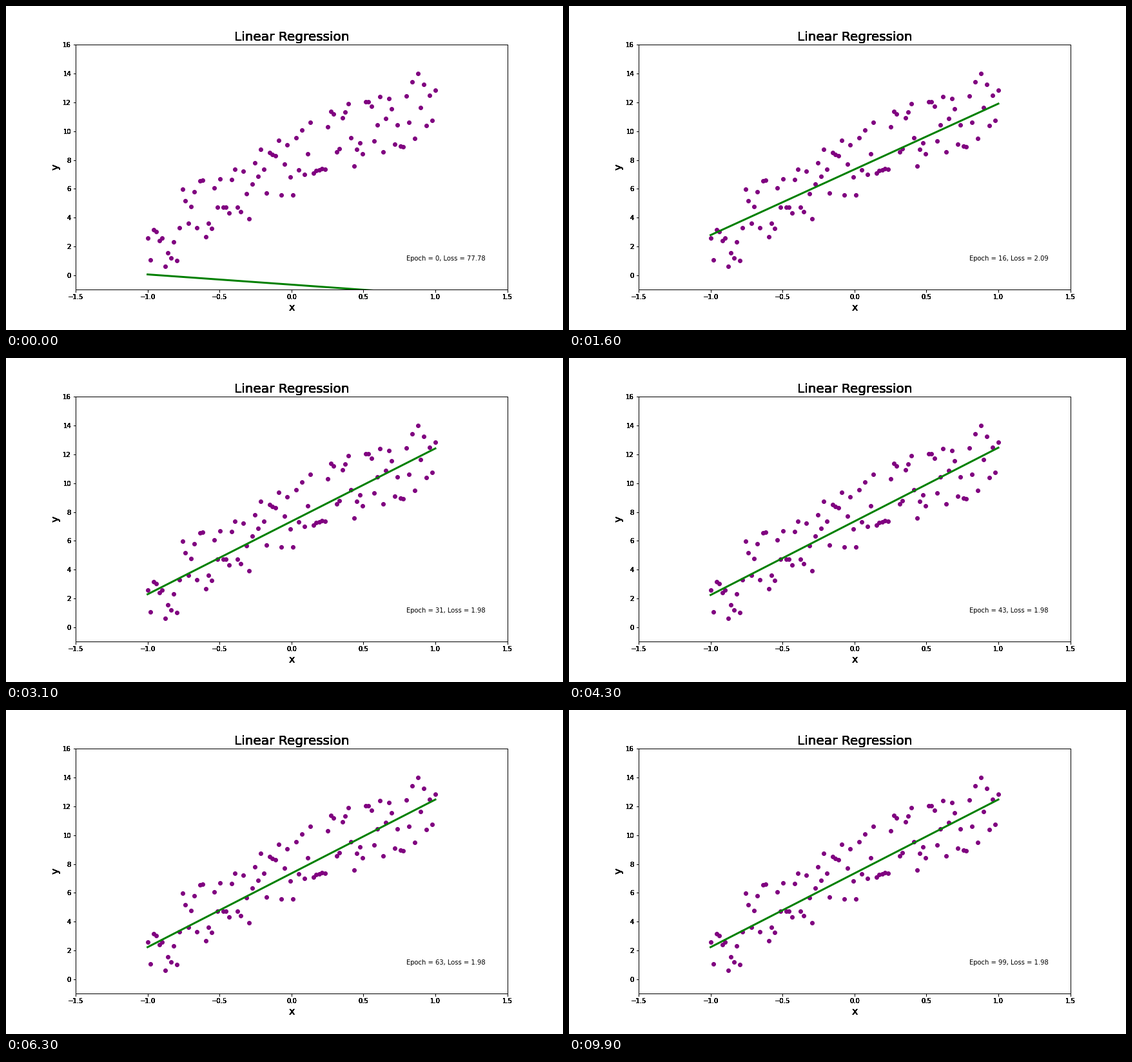
Recreate the animation shown at these times as a matplotlib script. Size 864 by 504 pixels, loop 10 s.

```python
import numpy as np
import matplotlib.pyplot as plt
from matplotlib.animation import FuncAnimation

EPOCHS = 100
RATE = 0.2

plt.rcParams.update({"font.family": "DejaVu Sans", "font.size": 10})

x = np.linspace(-1, 1, 100)
y = np.array([
    2.57, 1.06, 3.14, 3.02, 2.40, 2.57, 0.61, 1.55, 1.19, 2.31,
    1.01, 3.29, 5.97, 5.16, 3.60, 4.76, 5.79, 3.29, 6.55, 6.59,
    2.66, 3.60, 3.24, 6.06, 4.72, 6.68, 4.72, 4.72, 4.32, 6.64,
    7.35, 4.72, 4.41, 7.22, 5.66, 3.91, 6.33, 7.80, 6.86, 8.74,
    7.35, 5.70, 8.52, 8.38, 8.29, 9.36, 5.57, 7.71, 9.05, 6.82,
    5.57, 9.54, 7.31, 10.08, 7.00, 8.43, 10.62, 7.09, 7.26, 7.31,
    7.40, 7.35, 10.30, 11.37, 11.20, 8.56, 8.78, 10.93, 11.33, 11.91,
    9.54, 7.58, 8.74, 9.19, 8.43, 12.04, 12.04, 11.73, 9.32, 10.44,
    12.40, 8.56, 10.88, 12.27, 11.55, 9.10, 10.44, 8.96, 8.92, 12.45,
    10.62, 13.43, 9.50, 14.01, 11.64, 13.25, 10.39, 12.49, 10.75, 12.85,
])

# Best fit, starting error and remaining loss of the descent
W, B = 5.13, 7.35
DW, DB = 5.84, 8.0126
FLOOR = 1.98
XX = np.mean(x ** 2)


def state(epoch):
    """Slope, intercept and loss after a number of gradient steps."""
    ew = DW * (1 - 2 * RATE * XX) ** epoch
    eb = DB * (1 - 2 * RATE) ** epoch
    return W - ew, B - eb, FLOOR + eb ** 2 + XX * ew ** 2


def overdraw(artist, times=8):
    """Paint an artist repeatedly so its soft edges turn solid."""
    draw = artist.draw

    def repeat(renderer):
        for _ in range(times):
            draw(renderer)

    artist.draw = repeat


fig = plt.figure(figsize=(12, 7), dpi=72, facecolor="white")
fig.subplots_adjust(left=0.125, right=0.9, bottom=0.125, top=0.88)
ax = fig.add_subplot()
ax.set_xticks(np.arange(-1.5, 1.6, 0.5))
ax.set_yticks(np.arange(0, 17, 2))
ax.set(xlim=(-1.5, 1.5), ylim=(-1, 16))
title = ax.set_title("Linear Regression", fontsize=20)
xlabel = ax.set_xlabel("x", fontsize=16)
ylabel = ax.set_ylabel("y", fontsize=16)

ax.scatter(x, y, color="purple")
line, = ax.plot([], [], color="green", lw=3)
note = ax.text(0.8, 1, "")

for artist in (title, xlabel, ylabel, *ax.spines.values()):
    overdraw(artist)
for tick in ax.xaxis.get_major_ticks() + ax.yaxis.get_major_ticks():
    overdraw(tick.label1)
    overdraw(tick.tick1line)


def update(epoch):
    w, b, loss = state(epoch)
    line.set_data(x, w * x + b)
    note.set_text(f"Epoch = {epoch}, Loss = {loss:.2f}")
    return line, note


anim = FuncAnimation(fig, update, frames=EPOCHS, interval=100, repeat=True,
                     repeat_delay=0, blit=False)
plt.show()
```
